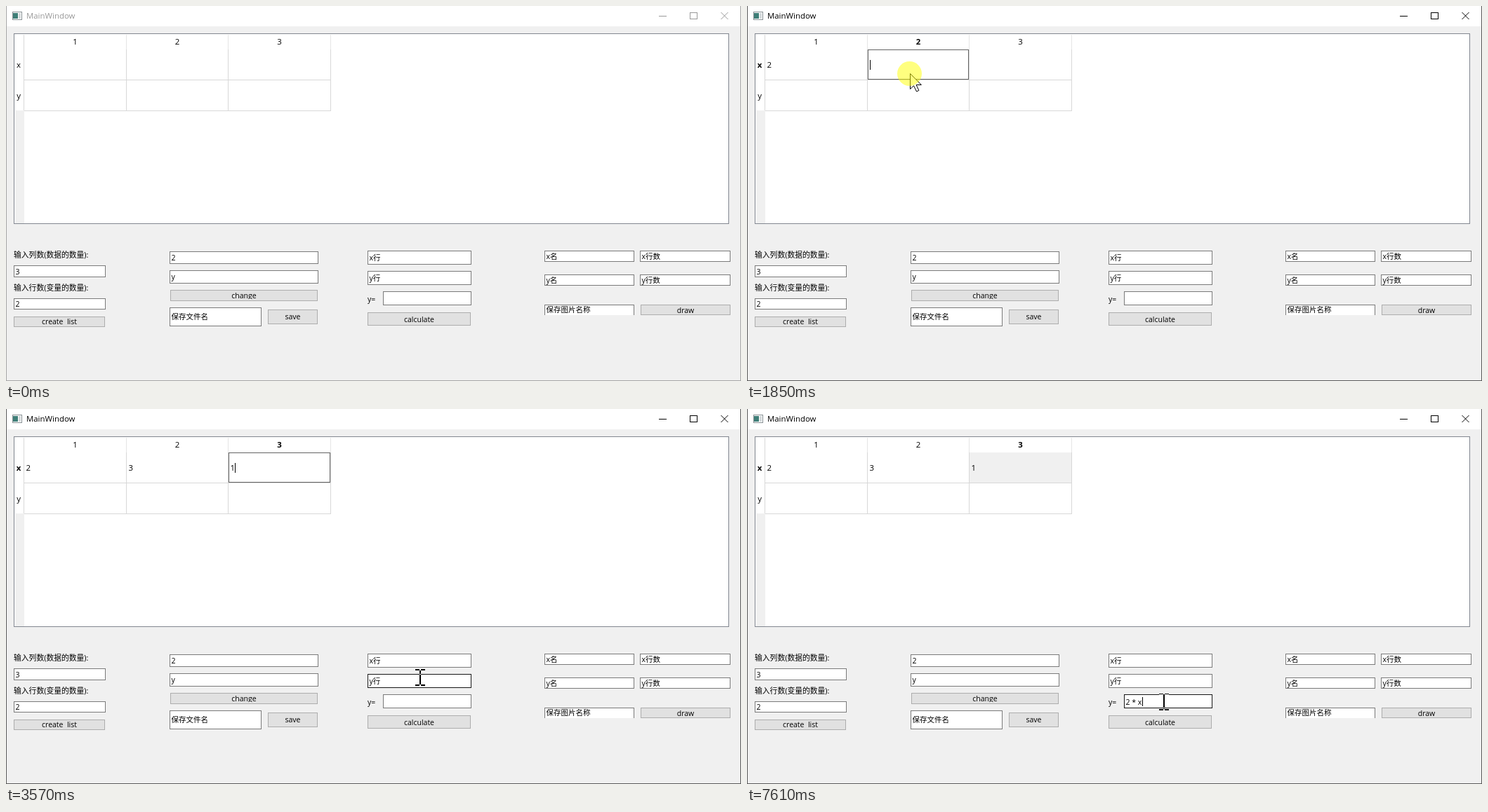
An HTML page with a canvas for the animation above (8 s loop, 1047 by 535 pixels).

```html
<!DOCTYPE html>
<html lang="zh">
<head>
<meta charset="utf-8">
<title>MainWindow</title>
<style>
html, body { margin: 0; width: 100%; height: 100%; overflow: hidden; background: #f0f0f0; }
canvas { display: block; }
</style>
</head>
<body>
<canvas id="stage" width="1047" height="535"></canvas>
<script>
const ctx = document.getElementById('stage').getContext('2d');
const LOOP = 8000, WINDOW_ACTIVE = 910, FIELD_CLICK = 4040, FIELD_RELEASE = 4260;
const FAMILY = '"Open Sans", "Noto Sans CJK SC", "Noto Sans CJK", sans-serif';
const SMALL = 10.5, NORMAL = 11.4;

// Left, top, right, bottom, text, baseline
const inputs = [
  [11, 370, 142, 387, '3', 383], [11, 417, 142, 433, '2', 429],
  [233, 350, 445, 368, '2', 363], [233, 377, 445, 396, 'y', 390],
  [233, 430, 364, 457, '保存文件名', 447],
  [515, 349, 663, 369, 'x行', 363], [515, 378, 663, 398, 'y行', 392],
  [537, 407, 663, 427, '', 422],
  [767, 349, 895, 365, 'x名', 361], [903, 349, 1032, 365, 'x行数', 361],
  [767, 383, 895, 399, 'y名', 395], [903, 383, 1032, 399, 'y行数', 395],
  [767, 426, 895, 442, '保存图片名称', 437]
];
const buttons = [
  [11, 443, 141, 458, 'create  list', 454], [234, 405, 444, 421, 'change', 417],
  [373, 433, 444, 454, 'save', 447], [515, 437, 662, 456, 'calculate', 451],
  [904, 426, 1032, 441, 'draw', 438]
];
const cells = [
  { left: 26, right: 171, click: 910, edit: 980, release: 1150, type: 1300, value: '2' },
  { left: 172, right: 316, click: 1780, edit: 1850, release: 2020, type: 2100, value: '3' },
  { left: 317, right: 462, click: 2550, edit: 2620, release: 2790, type: 3100, value: '1' }
];
// Time, text, caret position
const formula = [
  [0, '', 540], [6220, '2', 546], [6370, '2 ', 549],
  [6930, '2 *', 555], [7150, '2 * ', 557], [7610, '2 * x', 563]
];
const caretToggles = [4570, 5050, 5600, 6150];
// Time, x, y
const path = [
  [70, 776, 460], [830, 132, 94], [1380, 132, 94], [1560, 198, 99], [1700, 232, 96],
  [2120, 232, 96], [2270, 387, 95], [2480, 399, 95], [3230, 399, 95],
  [3570, 588, 380.5], [3720, 592, 416], [LOOP, 592, 416]
];

function box(x1, y1, x2, y2, color) {
  ctx.fillStyle = color;
  ctx.fillRect(x1, y1, x2 - x1, y2 - y1);
}

function frame(x1, y1, x2, y2, border, fill) {
  box(x1, y1, x2, y2, border);
  box(x1 + 1, y1 + 1, x2 - 1, y2 - 1, fill);
}

function text(str, x, y, { size = SMALL, align = 'left', color = '#000', weight = 400 } = {}) {
  ctx.font = `${weight} ${size}px ${FAMILY}`;
  ctx.textAlign = align;
  ctx.fillStyle = color;
  ctx.fillText(str, x, y);
}

function line(points, color) {
  ctx.strokeStyle = color;
  ctx.lineWidth = 1;
  ctx.beginPath();
  points.forEach(([x, y], i) => i ? ctx.lineTo(x, y) : ctx.moveTo(x, y));
  ctx.stroke();
}

function pointerAt(t) {
  const i = Math.max(1, path.findIndex(p => p[0] > t));
  const [t0, x0, y0] = path[i - 1], [t1, x1, y1] = path[i];
  let k = Math.max(0, (t - t0) / (t1 - t0));
  if (i === 1) k = k * k * (3 - 2 * k);
  return { x: x0 + (x1 - x0) * k, y: y0 + (y1 - y0) * k };
}

function drawWindow(active) {
  const ink = active ? '#000' : '#999';
  box(0, 0, 1047, 535, '#f0f0f0');
  box(0, 0, 1047, 29, '#fff');
  const edge = active ? '#5a5a5a' : '#a6a6a6';
  box(0, 0, 1, 535, edge);
  box(1046, 0, 1047, 535, edge);
  box(0, 534, 1047, 535, edge);

  frame(9, 8, 23, 20, '#8a9296', '#fff');
  box(10, 10, 17, 18, '#3f7f78');
  box(18, 10, 21, 18, '#d3d8da');
  text('MainWindow', 29, 18, { size: NORMAL, color: ink });
  box(930, 14, 941, 15, ink);
  frame(974, 9, 985, 19, ink, '#fff');
  line([[1018.5, 9], [1028.5, 19]], ink);
  line([[1028.5, 9], [1018.5, 19]], ink);
}

function drawTable(t, current) {
  frame(11, 39, 1030, 311, '#828790', '#fff');
  box(13, 149, 26, 310, '#f0f0f0');
  box(25, 41, 26, 149, '#d8d8d8');
  for (const x of [171, 316, 462]) {
    box(x, 41, x + 1, 62, '#e5e5e5');
    box(x, 62, x + 1, 150, '#d8d8d8');
  }
  for (const y of [105, 149]) box(26, y, 463, y + 1, '#d8d8d8');

  const label = { size: NORMAL, align: 'center' };
  cells.forEach((cell, i) => text(String(i + 1), (cell.left + cell.right) / 2, 55,
    { ...label, weight: cell === current ? 700 : 400 }));
  text('x', 18, 88, { ...label, weight: current ? 700 : 400 });
  text('y', 18, 132, label);

  if (current) {
    const { left, right } = current;
    if (t >= FIELD_CLICK) box(left, 62, right, 105, '#f0f0f0');
    else if (t >= current.edit) frame(left, 62, right, 105, '#646464', '#fff');
    else {
      box(left, 62, right, 105, '#0078d7');
      ctx.setLineDash([1, 1]);
      ctx.strokeStyle = '#ff8728';
      ctx.lineWidth = 1;
      ctx.strokeRect(left + .5, 62.5, right - left - 1, 42);
      ctx.setLineDash([]);
    }
  }
  for (const cell of cells) {
    if (t >= cell.type) text(cell.value, cell.left + 2.5, 88, { size: NORMAL });
  }
  if (current && t >= current.edit && t < FIELD_CLICK) {
    const typed = t >= current.type;
    const since = t - (typed ? current.type : current.edit);
    const x = current.left + (typed ? 9 : 3);
    if (since < 530) box(x, 77, x + 1, 91, '#000');
  }
}

function drawForm(t, hovered) {
  text('输入列数(数据的数量):', 11, 359, { size: 10.8 });
  text('输入行数(变量的数量):', 11, 406, { size: 10.8 });
  text('y=', 515, 422);
  for (const input of inputs) {
    const [x1, y1, x2, y2, value, baseline] = input;
    frame(x1, y1, x2, y2, input === hovered ? '#171717' : '#7a7a7a', '#fff');
    text(value, x1 + 2.5, baseline);
  }
  box(767, 441, 895, 442, '#f0f0f0');

  for (const [x1, y1, x2, y2, label, baseline] of buttons) {
    frame(x1, y1, x2, y2, '#adadad', '#e1e1e1');
    ctx.save();
    ctx.beginPath();
    ctx.rect(x1, y1, x2 - x1, y2 - y1 - 3);
    ctx.clip();
    text(label, (x1 + x2) / 2, baseline, { align: 'center' });
    ctx.restore();
  }

  if (t >= FIELD_CLICK) {
    const [, value, caret] = formula.findLast(step => t >= step[0]);
    text(value, 539.5, 422);
    if (caretToggles.filter(time => t >= time).length % 2 === 0) box(caret, 411, caret + 1, 424, '#000');
  }
}

function drawArrow(x, y) {
  const shape = [[0, 0], [0, 22], [5, 17.3], [9, 25.5], [12.3, 24], [8.6, 16], [15.8, 16]];
  ctx.beginPath();
  shape.forEach(([dx, dy]) => ctx.lineTo(x + dx + .5, y + dy + .5));
  ctx.closePath();
  ctx.fillStyle = '#fff';
  ctx.fill();
  ctx.strokeStyle = '#000';
  ctx.lineWidth = 1;
  ctx.stroke();
}

// The text pointer inverts whatever lies beneath it.
function drawTextPointer(x, y) {
  const cx = Math.round(x + 2), cy = Math.round(y + 2);
  ctx.globalCompositeOperation = 'difference';
  box(cx - 1, cy - 10, cx + 1, cy + 10, '#fff');
  for (const top of [cy - 12, cy + 10]) {
    box(cx - 7, top, cx - 1, top + 2, '#fff');
    box(cx + 1, top, cx + 7, top + 2, '#fff');
  }
  ctx.globalCompositeOperation = 'source-over';
}

function draw(t) {
  const current = cells.findLast(cell => t >= cell.click);
  const { x, y } = pointerAt(t);
  const inside = ([x1, y1, x2, y2]) => x >= x1 && x < x2 && y >= y1 && y < y2;
  const hovered = t >= 70 && inputs.find(inside);
  const overEditor = current && t >= current.release && t < FIELD_CLICK
    && inside([current.left, 62, current.right, 105]);

  drawWindow(t >= WINDOW_ACTIVE);
  drawTable(t, current);
  drawForm(t, hovered);
  if (t < 70) return;

  if (hovered || overEditor) drawTextPointer(x, y);
  else drawArrow(Math.round(x), Math.round(y));

  const pressed = (current && t < current.release) || (t >= FIELD_CLICK && t < FIELD_RELEASE);
  if (pressed) {
    ctx.fillStyle = 'rgba(255, 255, 0, .5)';
    ctx.beginPath();
    ctx.arc(x - .5, y + .5, 17.5, 0, 2 * Math.PI);
    ctx.fill();
  }
}

const start = performance.now();
function tick() {
  draw((performance.now() - start) % LOOP);
  requestAnimationFrame(tick);
}
tick();
</script>
</body>
</html>
```
